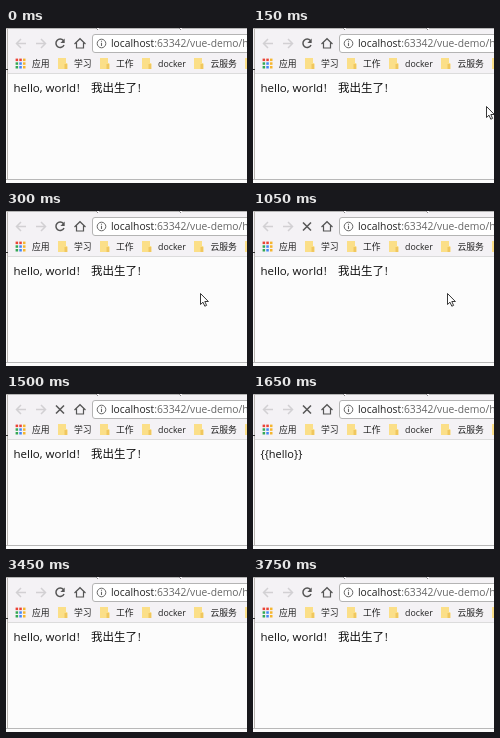
Recreate the animation shown at these times as an HTML page. Size 241 by 155 pixels, loop 3900 ms.

```html
<!DOCTYPE html>
<html lang="zh">
<head>
<meta charset="utf-8">
<title>Page reload</title>
<style>
  html, body { margin: 0; width: 100%; height: 100%; overflow: hidden; background: #fbfbfb; }
  svg { display: block; width: 241px; height: 155px; }
  text { font-family: "Open Sans", "Noto Sans CJK SC", "Noto Sans CJK", sans-serif; fill: #222; white-space: pre; }
  .mark { font-size: 8.8px; }
  .page { font-size: 11.5px; fill: #111; }
  .icon { fill: none; stroke: #555; stroke-width: 1.5; }
  .off { stroke: #d2d0d3; }
  .thin { stroke-width: 1.2; }
</style>
</head>
<body>
<svg viewBox="0 0 241 155">
  <rect width="241" height="155" fill="#fcfcfc"/>
  <rect width="241" height="45" fill="#f4f2f5"/>
  <path d="M0 .5H90M93 .5H173M176 .5H241" stroke="#b5b5b5"/>
  <path d="M90 0l2 2M173 0l2 2" stroke="#8a8a8a"/>
  <path d="M2 45.5H241" stroke="#dcdcdc"/>

  <path class="icon off" d="M20 15.5H10.5M15 11l-4.5 4.5L15 20"/>
  <path class="icon off" d="M30 15.5h9.5M35 11l4.5 4.5L35 20"/>
  <g id="reload">
    <path class="icon" d="M57.4 12.6A4.2 4.2 0 1 0 58 17"/>
    <path d="M58.7 10.6v4.3h-4.3z" fill="#555"/>
  </g>
  <path id="stop" class="icon" d="M50 11.5l8 8M58 11.5l-8 8"/>
  <path class="icon thin" d="M68.5 16l5.5-5.3 5.5 5.3M70.5 14.8v5.2h7v-5.2"/>

  <rect x="86.5" y="6.5" width="170" height="18" rx="2.5" fill="#fff" stroke="#b4b4b4"/>
  <circle cx="95.5" cy="15.5" r="4.3" fill="none" stroke="#666"/>
  <path d="M95.5 14.8v3.2M95.5 12.7v1.1" stroke="#666" stroke-width="1.1"/>
  <text x="105" y="19.2" font-size="10.3">localhost<tspan fill="#666">:63342/vue-demo/h</tspan></text>

  <g id="apps"></g>
  <g id="marks"></g>

  <g id="greeting">
    <text class="page" x="7.5" y="63.5">hello, world</text>
    <text class="page" x="70.8" y="63.5">!</text>
    <text class="page" x="85" y="63.8">我出生了</text>
    <text class="page" x="131.8" y="63.5">!</text>
  </g>
  <text id="raw" class="page" x="7.5" y="63.5" style="font-size:11px">{{hello}}</text>

  <path d="M0 151.5H241" stroke="#b8b8b8"/>
  <path d="M1.5 0V151" stroke="#bab6b2"/>
  <path d="M0 41.5h2" stroke="#333"/>
  <path id="cursor" d="M.5 .5v11l2.5-2.3 1.8 4 1.8-.8-1.8-3.9h3.6z" fill="#fff" stroke="#222" stroke-width=".9"/>
</svg>
<script>
const LOOP = 3900;
const $ = id => document.getElementById(id);

function add(parent, tag, attrs, text = "") {
  const el = document.createElementNS("http://www.w3.org/2000/svg", tag);
  for (const key in attrs) el.setAttribute(key, attrs[key]);
  el.textContent = text;
  parent.append(el);
}

const colors = ["#ea4335", "#ea4335", "#f5b52e", "#34a853", "#4285f4", "#f5b52e", "#34a853", "#4285f4", "#f5b52e"];
colors.forEach((fill, i) => add($("apps"), "rect", {
  x: 9.6 + i % 3 * 3.7, y: 30.6 + Math.floor(i / 3) * 3.7, width: 2.5, height: 2.5, fill
}));

add($("marks"), "text", { class: "mark", x: 26, y: 39.3 }, "应用");
const folders = [[52, "学习", 68], [94, "工作", 110], [136, "docker", 152], [188, "云服务", 204.5], [239, "", 255]];
for (const [x, label, textX] of folders) {
  add($("marks"), "path", { d: `M${x} 30h8v5h1.3v6h-9.3z`, fill: "#fbdf88" });
  add($("marks"), "path", { d: `M${x + 6.5} 36h2.8v5h-2.8z`, fill: "#f0c75e" });
  add($("marks"), "text", { class: "mark", x: textX, y: 39.3 }, label);
}

// Each step is [start in ms, value], held until the next one.
function hold(el, prop, steps) {
  const frames = steps.map(([at, value]) => ({ offset: at / LOOP, [prop]: value, easing: "step-end" }));
  frames.push({ offset: 1, [prop]: steps[steps.length - 1][1] });
  return el.animate(frames, { duration: LOOP, iterations: Infinity });
}

const runs = [
  hold($("reload"), "opacity", [[0, 1], [1050, 0], [3450, 1]]),
  hold($("stop"), "opacity", [[0, 0], [1050, 1], [3450, 0]]),
  hold($("greeting"), "opacity", [[0, 1], [1650, 0], [3450, 1]]),
  hold($("raw"), "opacity", [[0, 0], [1650, 1], [3450, 0]]),
  hold($("cursor"), "opacity", [[0, 0], [150, 1], [1500, 0]]),
  hold($("cursor"), "transform", [[0, "translate(233px, 78px)"], [300, "translate(194px, 82px)"]])
];
for (const run of runs) run.startTime = document.timeline.currentTime;
</script>
</body>
</html>
```
